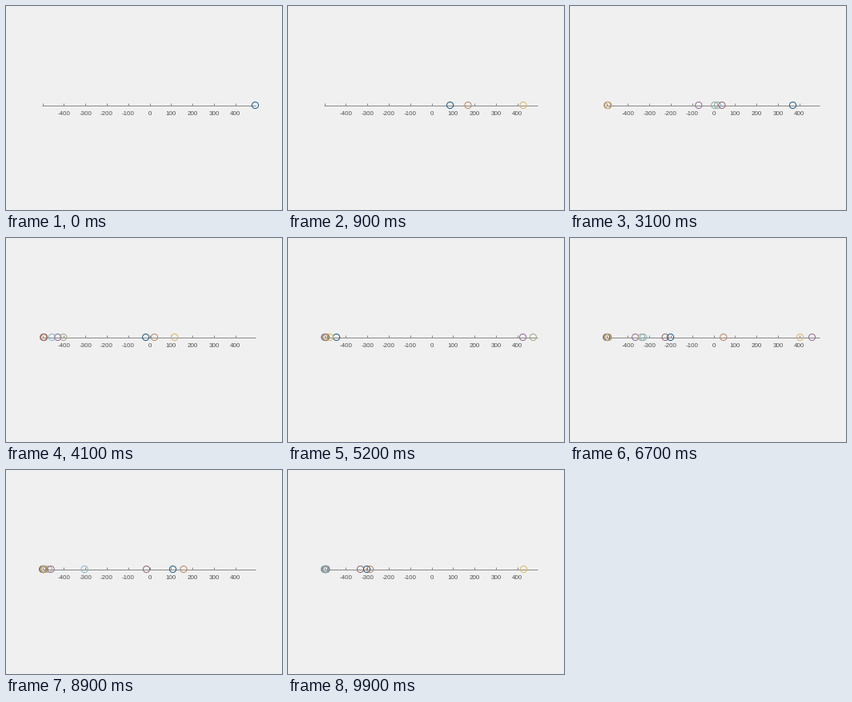
Recreate the animation shown at these times as a matplotlib script. Size 345 by 256 pixels, loop 10 s.

```python
import numpy as np
import matplotlib.pyplot as plt
from matplotlib.animation import FuncAnimation

W, H, DPI = 345, 256, 100
FRAMES, INTERVAL = 100, 100
PX = 72 / DPI
START, AXIS_Y = 311.5, 124.5
GRAY = "#8a8a8a"
COLORS = ["#17557f", "#b8825f", "#d9b565", "#8d6592",
          "#a3a383", "#7fb3c6", "#94606a"]

# launch time in frames, speed in pixels per frame
RUNS = np.array([
    (0, 12.1), (4, 17.3), (8, 17.5), (15.3, 9.6), (19, 10.9), (21, 12.7),
    (23, 15.2), (27.82, 10.38), (32, 14), (34, 14.4), (50.73, 14.13),
    (51.65, 14.47), (53, 15.7), (54, 14.8), (56, 16.9), (58, 13.3),
    (64.85, 11.14), (66.2, 11.2), (68, 12.3), (72, 12.55), (73, 8.5),
    (79.64, 11), (81.5, 11.94), (97.5, 11.3),
])
launch, speed = RUNS.T
stops = 45.5 + np.random.default_rng(4).uniform(0, 2.2, len(RUNS))
edges = np.array([COLORS[i % len(COLORS)] for i in range(len(RUNS))])


def to_px(value):
    return 179.5 + 0.268 * value


fig = plt.figure(figsize=(W / DPI, H / DPI), dpi=DPI, facecolor="#f0f0f0")
ax = fig.add_axes([0, 0, 1, 1])
ax.set_xlim(0, W)
ax.set_ylim(H, 0)
ax.axis("off")

ax.plot([45, 312], [AXIS_Y] * 2, color=GRAY, lw=PX, solid_capstyle="butt")
for value in range(-500, 500, 100):
    x = to_px(value)
    ax.plot([x, x], [122, 125], color=GRAY, lw=PX, solid_capstyle="butt")
    if value > -500:
        ax.text(x, 137.3, f"{value}".replace("\u2212", "-"), ha="center",
                va="baseline", family="Liberation Sans",
                fontsize=8 * PX, color="#505050")

dots = ax.scatter([], [], s=(8.2 * PX) ** 2, facecolors="none",
                  linewidths=0.95 * PX, zorder=3)


def update(frame):
    live = frame >= launch
    x = np.maximum(START - speed * (frame - launch), stops)[live]
    dots.set_offsets(np.column_stack([x, np.full(x.size, AXIS_Y)]))
    dots.set_edgecolors(edges[live])
    return dots,


anim = FuncAnimation(fig, update, frames=FRAMES, interval=INTERVAL,
                     repeat=True, repeat_delay=0)
plt.show()
```
